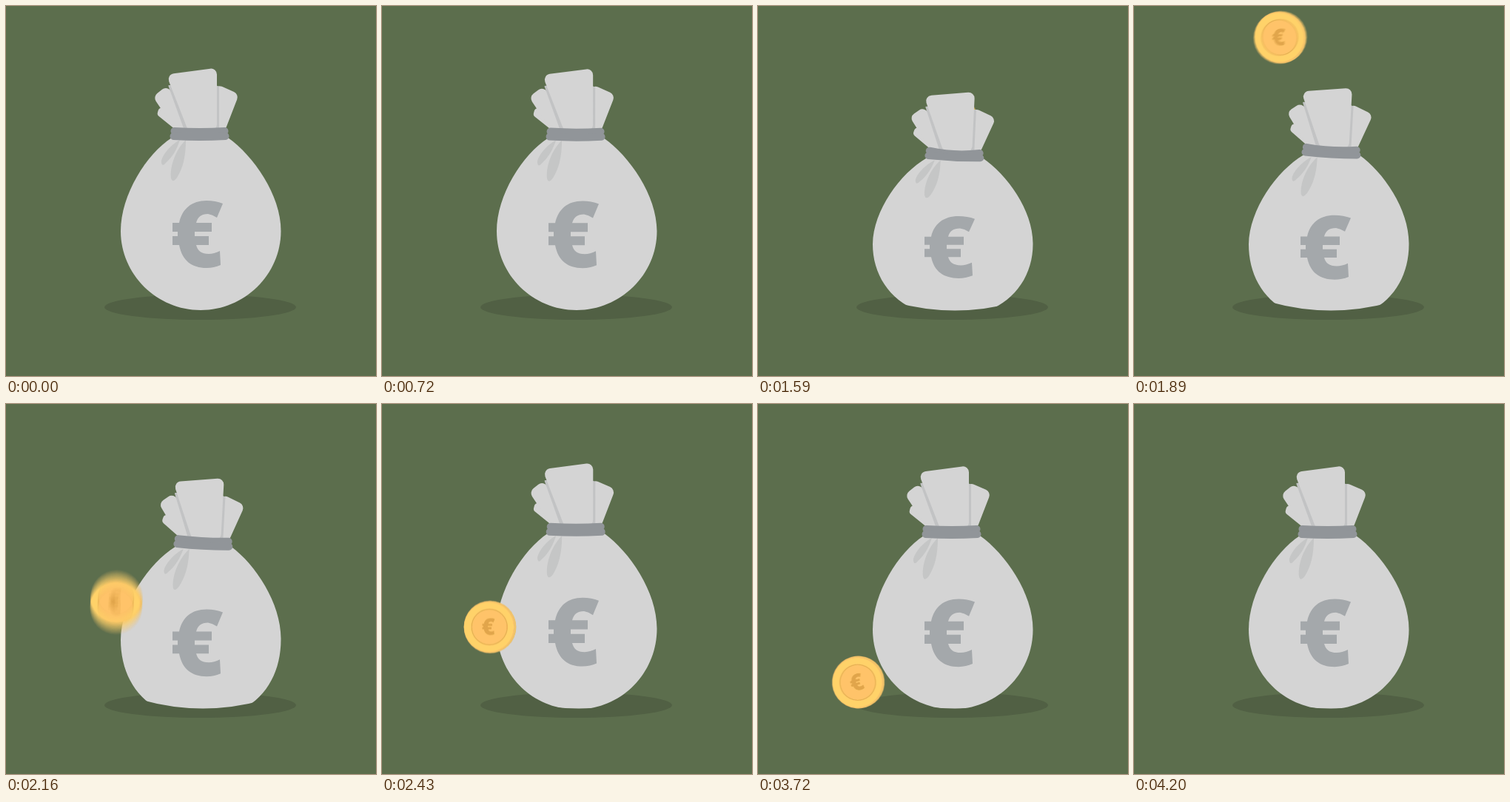
An HTML page with a canvas for the animation above (4230 ms loop, 500 by 500 pixels).

```html
<!DOCTYPE html>
<html lang="en">
<head>
<meta charset="utf-8">
<title>Money bag</title>
<style>
  html, body { margin: 0; width: 100%; height: 100%; overflow: hidden; background: #5c6e4d; }
  canvas { display: block; width: 100vw; height: 100vh; }
</style>
</head>
<body>
<canvas id="stage" width="500" height="500"></canvas>
<script>
const LOOP = 4230;
const GROUND = 376;
const REST_X = 146;
const GRAVITY = 0.00503;
const APEX = { t: 1860, y: 40 };
const LAND = APEX.t + Math.sqrt(2 * (GROUND - APEX.y) / GRAVITY);
const C = {
  bg: '#5c6e4d', shadow: '#516044', bag: '#d4d4d4', fold: '#c2c3c4',
  crease: '#c5c6c6', band: '#919599', sign: '#a4a8ab',
  rim: '#efb95d', face: '#fcc567', inner: '#fac162', ring: '#dfa84b', mark: '#d59b41'
};

function makeLayer() {
  const canvas = document.createElement('canvas');
  canvas.width = canvas.height = 500;
  return canvas.getContext('2d');
}
const stage = document.getElementById('stage').getContext('2d');
const blur = makeLayer(), sample = makeLayer();

const euro = new Path2D('M293 267Q283 263 271 263C251 263 238 274 234 293H225V305H232V311H225V323H234' +
  'C238 344 251 354 271 354Q281 354 290 350L289 331Q281 335 274 335C264 335 259 331 257 323H274V311H255' +
  'V305H278V293H257C259 285 264 281 273 281Q279 282 285 286Z');
const creases = new Path2D('M243 181C231 192 221 215 223 233Q225 240 231 232C239 219 243 204 243 181Z' +
  'M235 181C224 186 209 203 210 212Q211 218 216 212C226 203 231 193 235 181Z');

// time, neck y, bottom y, neck shift, head tilt in degrees
const POSES = [
  [660, 173, 411, 0, 0],
  [1110, 190, 414.5, 2, 1.8],
  [1590, 201, 420.5, 4, 2.7],
  [2160, 188, 425, 5, 3.1],
  [2420, 170, 413, 0.3, 0.1],
  [2790, 173, 412.5, 0, 0]
];

// Smooth curve through the poses, at rest at both ends
function poseAt(t) {
  const last = POSES.length - 1;
  if (t <= POSES[0][0]) return POSES[0].slice(1);
  if (t >= POSES[last][0]) return POSES[last].slice(1);
  const i = POSES.findIndex(p => p[0] > t) - 1;
  const a = POSES[i], b = POSES[i + 1];
  const span = b[0] - a[0], u = (t - a[0]) / span;
  const slope = (k, c) => k === 0 || k === last ? 0
    : (POSES[k + 1][c] - POSES[k - 1][c]) / (POSES[k + 1][0] - POSES[k - 1][0]);
  return [1, 2, 3, 4].map(c =>
    a[c] * (1 + 2 * u) * (1 - u) ** 2 + b[c] * u * u * (3 - 2 * u) +
    span * (slope(i, c) * u * (1 - u) ** 2 - slope(i + 1, c) * u * u * (1 - u)));
}

function bounceHeight(t) {
  let start = LAND;
  for (let len = 350; len > 20; len *= 0.68) {
    if (t < start + len) return GRAVITY / 2 * (t - start) * (start + len - t);
    start += len;
  }
  return 0;
}

function coinAt(t) {
  const fly = Math.min(1, Math.max(0, (t - 1710) / 540));
  const roll = Math.max(0, (t - 3570) / 630);
  const x = REST_X + 117 * (1 - fly) ** 2 - 181 * roll * roll;
  let y;
  if (t < APEX.t) {
    const u = Math.max(0, (t - 1540) / (APEX.t - 1540));
    y = 165 + (APEX.y - 165) * (1 - Math.cos(Math.PI * u)) / 2;
  } else if (t < LAND) {
    y = APEX.y + GRAVITY / 2 * (t - APEX.t) ** 2;
  } else {
    y = GROUND - bounceHeight(t);
  }
  return { x, y, turn: roll > 0 ? (x - REST_X) / 35 : 0 };
}

function disc(g, x, y, r, fill) {
  g.beginPath();
  g.arc(x, y, r, 0, 2 * Math.PI);
  g.fillStyle = fill;
  g.fill();
}

function rounded(g, pts, r, fill) {
  const n = pts.length, [a, b] = [pts[n - 1], pts[0]];
  g.beginPath();
  g.moveTo((a[0] + b[0]) / 2, (a[1] + b[1]) / 2);
  pts.forEach((p, i) => g.arcTo(...p, ...pts[(i + 1) % n], r));
  g.closePath();
  g.fillStyle = fill;
  g.fill();
}

function paintCoin(g, { x, y, turn }) {
  g.save();
  g.translate(x, y);
  g.rotate(turn);
  disc(g, 0, 0, 35.4, C.rim);
  disc(g, -1.5, 0, 33.7, C.face);
  disc(g, -0.8, 0, 24, C.inner);
  g.strokeStyle = C.ring;
  g.lineWidth = 1.3;
  g.stroke();
  g.translate(-2, -0.5);
  g.scale(0.25, 0.25);
  g.translate(-259, -308.5);
  g.fillStyle = C.mark;
  g.fill(euro);
  g.restore();
}

// Averages the coin over a short shutter time
function drawCoin(t) {
  const shutter = 12, n = 15;
  const a = coinAt(t - shutter / 2), b = coinAt(t + shutter / 2);
  stage.save();
  if (t > 3570) {
    stage.beginPath();
    stage.rect(12, 0, 488, 500);
    stage.clip();
  }
  if (Math.hypot(a.x - b.x, a.y - b.y) < 0.5) {
    paintCoin(stage, coinAt(t));
  } else {
    blur.clearRect(0, 0, 500, 500);
    blur.globalCompositeOperation = 'lighter';
    blur.globalAlpha = 1 / n;
    for (let i = 0; i < n; i++) {
      sample.clearRect(0, 0, 500, 500);
      paintCoin(sample, coinAt(t + shutter * ((i + 0.5) / n - 0.5)));
      blur.drawImage(sample.canvas, 0, 0);
    }
    stage.drawImage(blur.canvas, 0, 0);
  }
  stage.restore();
}

const squash = (neck, bottom) => (bottom - neck) / 238;

function drawBody(neck, bottom, shift) {
  const g = stage, s = squash(neck, bottom);
  const bulge = 0.9 * (bottom - 411);
  const at = (x, y) => [x + shift * (Math.max(0, 303 - y) / 130) ** 2, bottom - (411 - y) * s];
  const curve = (...p) => g.bezierCurveTo(...at(p[0], p[1]), ...at(p[2], p[3]), ...at(p[4], p[5]));

  g.save();
  // The floor presses the underside flat
  g.beginPath();
  g.moveTo(100, 0);
  g.lineTo(100, 364.5);
  g.quadraticCurveTo(266, 458.5, 432, 364.5);
  g.lineTo(432, 0);
  g.clip();
  g.beginPath();
  g.moveTo(...at(224, 178));
  curve(190, 200, 155, 255, 155, 304);
  curve(155, 363, 204 - bulge, 411, 263, 411);
  curve(322 + bulge, 411, 371.5, 363, 371.5, 304);
  curve(371.5, 255, 334, 202, 300, 178);
  g.closePath();
  g.fillStyle = C.bag;
  g.fill();
  g.restore();

  g.save();
  g.transform(1, 0, 0, s, 0, bottom - 411 * s);
  g.fillStyle = C.sign;
  g.fill(euro);
  const k = shift / 130;
  g.transform(1, 0, -k, 1, 303 * k, 0);
  g.fillStyle = C.crease;
  g.fill(creases);
  g.restore();
}

function drawHead(neck, bottom, shift, tilt) {
  const g = stage, s = squash(neck, bottom);
  g.save();
  g.translate(262 + shift, neck);
  g.rotate(tilt * Math.PI / 180);
  g.scale(1, (1 + s) / 2);
  g.translate(-262, -173);
  rounded(g, [[208, 133], [204, 147], [229, 167], [242, 167]], 5, C.bag);
  rounded(g, [[209, 136], [211, 137], [236, 167], [229, 167]], 1, C.fold);
  rounded(g, [[219, 106.5], [198.5, 122.5], [229, 168], [247, 168]], 8, C.bag);
  rounded(g, [[283, 105], [315, 119], [296, 168], [268, 168]], 8, C.bag);
  rounded(g, [[219, 107], [224, 107], [249, 168], [241, 168]], 1, C.fold);
  rounded(g, [[283, 107], [288, 109], [288, 168], [283, 168]], 0.5, C.fold);
  rounded(g, [[216.5, 92.5], [285, 83.5], [285, 168], [246, 168]], 8, C.bag);

  // The band sags as the bag is pressed down
  const sag = 2 + 50 * Math.max(0, 1 - s);
  g.strokeStyle = C.band;
  g.lineWidth = 10;
  g.lineCap = 'round';
  for (const [x1, x2, y, dip] of [[227.5, 295.5, 169, sag], [226.5, 296.5, 176, 2]]) {
    g.beginPath();
    g.moveTo(x1, y);
    g.quadraticCurveTo(262, y + dip, x2, y);
    g.stroke();
  }
  g.restore();
}

function draw(t) {
  const pose = poseAt(t);
  stage.fillStyle = C.bg;
  stage.fillRect(0, 0, 500, 500);
  stage.beginPath();
  stage.ellipse(262.5, 407, 129.5, 17, 0, 0, 2 * Math.PI);
  stage.fillStyle = C.shadow;
  stage.fill();
  if (t >= 1540 && t < APEX.t) drawCoin(t);
  drawBody(...pose);
  drawHead(...pose);
  if (t >= APEX.t) drawCoin(t);
}

const begin = performance.now();
function tick() {
  draw((performance.now() - begin) % LOOP);
  requestAnimationFrame(tick);
}
tick();
</script>
</body>
</html>
```
